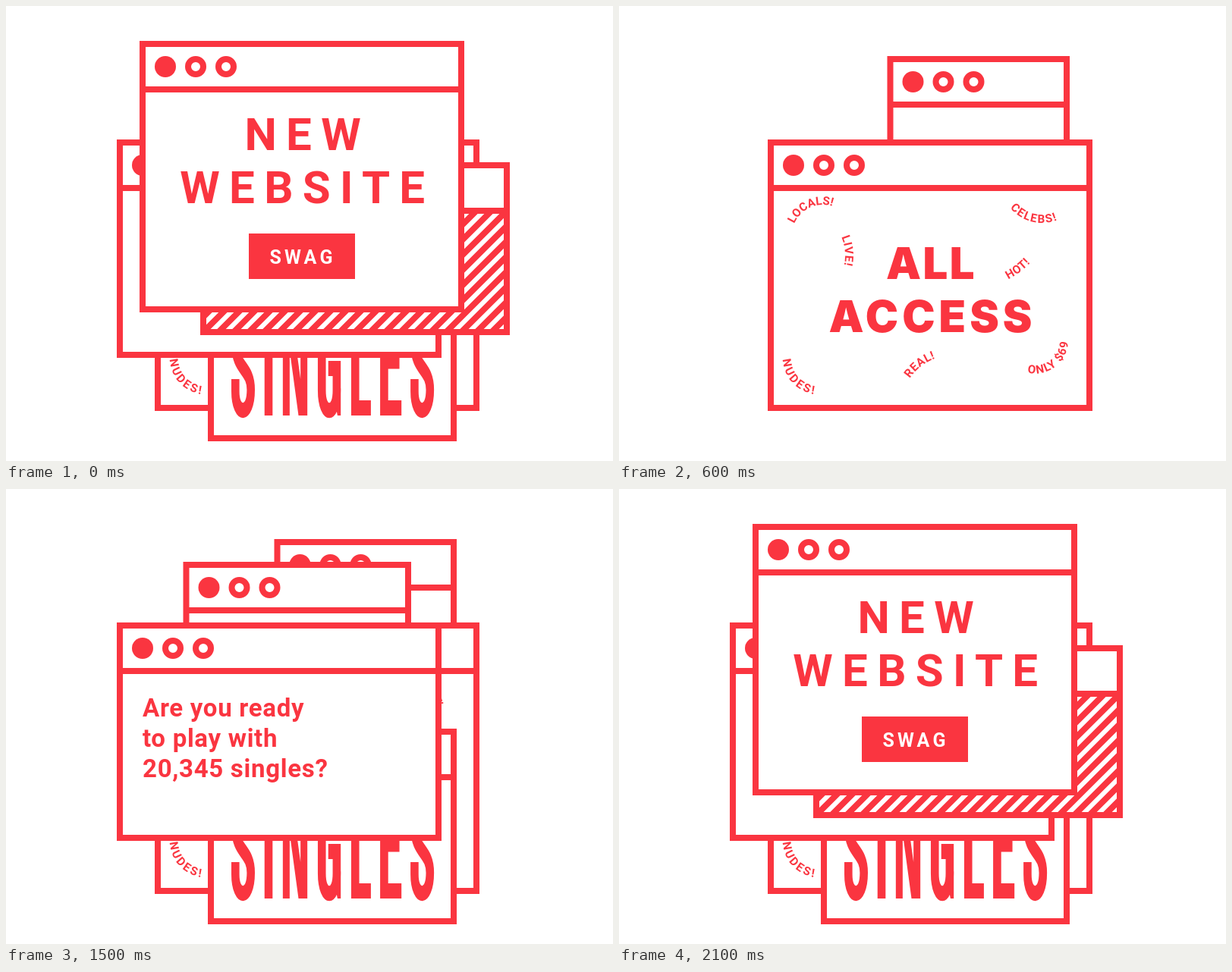
An HTML page for the animation above (2700 ms loop, 800 px wide and 600 px high).

```html
<!DOCTYPE html>
<html lang="en">
<head>
<meta charset="utf-8">
<title>Pop-up windows</title>
<style>
  html, body { margin: 0; width: 100%; height: 100%; overflow: hidden; background: #fff; }
  svg { display: block; width: 800px; height: 600px; --red: #fa3540; fill: var(--red); }

  .box { fill: #fff; stroke: var(--red); stroke-width: 8; }
  .line { fill: none; stroke: var(--red); stroke-width: 20; }
  .stripes { stroke: var(--red); stroke-width: 600; stroke-dasharray: 8 6.1421; }

  text { white-space: pre; }
  .site { font: 700 60px Roboto, sans-serif; letter-spacing: 12.3px; }
  .swag { font: 700 25px Roboto, sans-serif; letter-spacing: 4.2px; fill: #fff; }
  .heavy { font: 900 58px Inter, sans-serif; text-anchor: middle; }
  .clock { font: 900 17.5px Inter, sans-serif; letter-spacing: 1.3px; }
  .ask { font: 600 33px Roboto, sans-serif; letter-spacing: .7px; }
  .tag { font: 600 15.3px Roboto, sans-serif; }

  /* All windows show for one beat, then they pop up one by one. */
  .pop { animation: 2.7s step-end infinite; }
  #access  { animation-name: pop2; }
  #singles { animation-name: pop3; }
  #wink    { animation-name: pop4; }
  #ask     { animation-name: pop5; }
  #abort   { animation-name: pop6; }
  #site    { animation-name: pop7; }
  @keyframes pop2 { 0%, 22.2222% { opacity: 1 } 11.1111% { opacity: 0 } }
  @keyframes pop3 { 0%, 33.3333% { opacity: 1 } 11.1111% { opacity: 0 } }
  @keyframes pop4 { 0%, 44.4444% { opacity: 1 } 11.1111% { opacity: 0 } }
  @keyframes pop5 { 0%, 55.5555% { opacity: 1 } 11.1111% { opacity: 0 } }
  @keyframes pop6 { 0%, 66.6666% { opacity: 1 } 11.1111% { opacity: 0 } }
  @keyframes pop7 { 0%, 77.7777% { opacity: 1 } 11.1111% { opacity: 0 } }
</style>
</head>
<body>
<svg viewBox="0 0 800 600">
  <defs>
    <g id="dots">
      <circle cx="34" cy="34" r="14"/>
      <circle class="box" cx="74" cy="34" r="10"/>
      <circle class="box" cx="114" cy="34" r="10"/>
    </g>
    <path id="sheet" class="box" d="M421.8 206.5L462 182.4L525.7 206.5L485.7 230.4Z"/>
    <path id="ess" class="line" d="M48.5 45V36C48.5 1 10 1 10 36V42C10 75 48.5 72 48.5 102C48.5 138 10 138 10 104V88"/>
    <clipPath id="body"><path d="M260 270H660V430H260Z"/></clipPath>
  </defs>

  <g id="layers">
    <path class="box" d="M357.5 70H590V320H357.5ZM357.5 130H590"/>
    <use href="#dots" x="353.5" y="66"/>
    <use href="#sheet" y="39.4"/>
    <use href="#sheet" y="19.7"/>
    <use href="#sheet"/>
  </g>

  <g id="access" class="pop">
    <path class="box" d="M200 180H620V530H200ZM200 240H620"/>
    <use href="#dots" x="196" y="176"/>
    <text class="heavy" x="411.5" y="360" letter-spacing="2.5">ALL</text>
    <text class="heavy" x="413" y="430" letter-spacing="5">ACCESS</text>
    <g id="tags"></g>
  </g>

  <g id="singles" class="pop">
    <path class="box" d="M270 320H590V570H270ZM270 380H590"/>
    <use href="#dots" x="266" y="316"/>
    <g transform="translate(297 404) scale(.53 1)" role="img" aria-label="SINGLES">
      <use href="#ess"/>
      <path class="line" d="M92.5 3V136"/>
      <path d="M128 136V3H150L172 88V3H189V136H167L145 50V136Z"/>
      <path class="line" d="M262 46V36C262 1 225 1 225 36V103C225 138 262 138 262 103V74H241"/>
      <path d="M272 100V136H264L258 120Z"/>
      <path class="line" d="M308 3V126H347M423 13H380V126H423M380 64.5H418"/>
      <use href="#ess" x="445.5"/>
    </g>
  </g>

  <g id="wink" class="pop">
    <path class="box" d="M237.5 100H530V340H237.5ZM237.5 160H530"/>
    <use href="#dots" x="233.5" y="96"/>
    <g role="img" aria-label=";)">
      <path d="M275.5 218H298V240.5H275.5Z"/>
      <path d="M275.5 257.5H298V278C298 293 290 300 275.5 301V291C281 290 283.5 286 283.5 280H275.5Z"/>
      <path d="M318.5 190C338 203 351 222 351 245C351 268 338 287 318.5 300L312 292C324 281 331 264 331 245C331 226 324 210 312 198Z"/>
    </g>
    <text class="clock" x="421" y="250">4:20PM</text>
  </g>

  <g id="ask" class="pop">
    <path class="box" d="M150 180H570V460H150ZM150 240H570"/>
    <use href="#dots" x="146" y="176"/>
    <g class="ask">
      <text x="180" y="300">Are you ready</text>
      <text x="180" y="340">to play with</text>
      <text x="180" y="380">20,345 singles?</text>
    </g>
  </g>

  <g id="abort" class="pop">
    <path class="box" d="M260 210H660V430H260ZM260 270H660"/>
    <use href="#dots" x="256" y="206"/>
    <g clip-path="url(#body)">
      <path class="stripes" d="M317.17 207.17L610 500"/>
    </g>
    <path class="box" d="M320 320H600V370H320Z"/>
    <g fill-rule="evenodd" role="img" aria-label="ABORT!">
      <path d="M332 358L347 332H358L373 358H361.5L359 353.5H345L342.5 358ZM348.5 347.5H356L352 340Z"/>
      <path d="M383 332H408C417 332 420 335 420 338.5C420 342 418 344 415 344.7C419 345.5 422 347.5 422 351C422 355.5 418 358 409 358H383ZM394 338V342.5H406C410 342.5 410 338 406 338ZM394 347.5V352.5H407C411.5 352.5 411.5 347.5 407 347.5Z"/>
      <path d="M432 345a20.5 13.6 0 0 1 41 0a20.5 13.6 0 0 1 -41 0ZM443 345a9.5 7.4 0 0 0 19 0a9.5 7.4 0 0 0 -19 0Z"/>
      <path d="M485 332H510C518 332 522 335 522 340C522 344 519 346.5 515.5 347.3L523 358H510.5L504.5 348.5H496V358H485ZM496 338V343H507C511.5 343 511.5 338 507 338Z"/>
      <path d="M531 332H565V339H553.5V358H542.5V339H531Z"/>
      <path d="M574.5 332H588L586 347H577ZM576 351H587V358H576Z"/>
    </g>
  </g>

  <g id="site" class="pop">
    <path class="box" d="M180 50H600V400H180ZM180 110H600"/>
    <use href="#dots" x="176" y="46"/>
    <text class="site" x="314.4" y="190">NEW</text>
    <text class="site" x="229.3" y="260">WEBSITE</text>
    <path d="M320 300H460V360H320Z"/>
    <text class="swag" x="347.5" y="340">SWAG</text>
  </g>
</svg>
<script>
  // Text on an arc: start point, start angle, radius (negative turns left), letter spacing.
  const tags = [
    ['LOCALS!', 231, 287, -67, 41, 0],
    ['CELEBS!', 515.5, 266, 51, -54, 1.6],
    ['LIVE!', 293, 304.5, 66, 59, .6],
    ['HOT!', 513, 360.4, -27, -105, .6],
    ['NUDES!', 216, 466, 88, -48, 2.7],
    ['REAL!', 383.3, 491, -56, 70, .5],
    ['ONLY $69', 538.5, 483.3, 14, -43, 1.3]
  ];

  function bend([text, x, y, deg, r, gap], i) {
    const a = deg * Math.PI / 180;
    const b = a + Math.sign(r) * 2.5;
    const endX = x + r * (Math.sin(b) - Math.sin(a));
    const endY = y - r * (Math.cos(b) - Math.cos(a));
    const size = Math.abs(r);
    return `<path id="arc${i}" fill="none" d="M${x} ${y}A${size} ${size} 0 0 ${r > 0 ? 1 : 0} ${endX} ${endY}"/>
      <text class="tag" letter-spacing="${gap}"><textPath href="#arc${i}">${text}</textPath></text>`;
  }

  document.getElementById('tags').innerHTML = tags.map(bend).join('');
</script>
</body>
</html>
```
